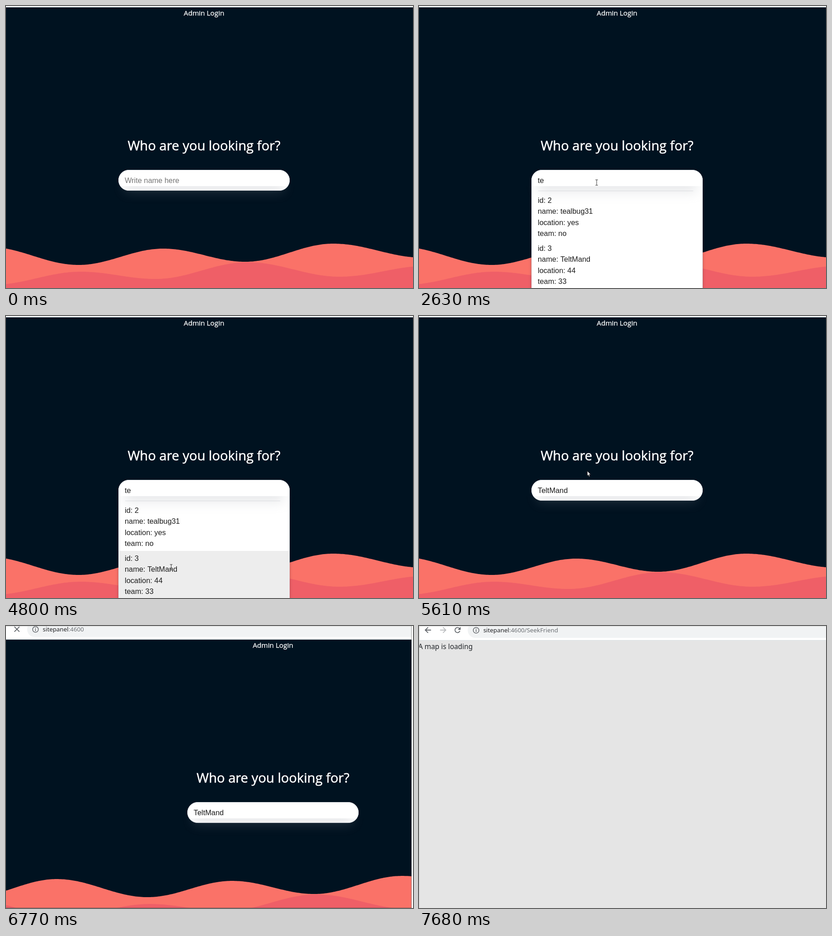
An HTML page with a canvas that plays this animation: 898x623 px, repeating every 8 s.

```html
<!DOCTYPE html>
<html lang="en">
<head>
<meta charset="utf-8">
<title>Person search</title>
<style>
html, body { margin: 0; width: 100%; height: 100%; overflow: hidden; background: #001220; }
canvas { display: block; }
</style>
</head>
<body>
<canvas id="stage" width="898" height="623"></canvas>
<script>
const ctx = document.getElementById('stage').getContext('2d');
const W = 898, H = 623, LOOP = 8000;
const PAGE_LEFT = -213, PAGE_W = 1300, PAGE_TOP = 3, CENTER = 437;

const HEADING = '"Open Sans", sans-serif';
const FIELD = '16.33px "Liberation Sans", Arial, sans-serif';
const SYSTEM = '"Noto Sans", sans-serif';
const ICON = '#5f6368';

const FOCUS_AT = 1750, TYPE_AT = [2280, 2410], OPEN_AT = 2630, CLOSE_AT = 4870;
const PAN_AT = 6150, LEAVE_AT = 7490, RENDER_AT = 7550, LOADED_AT = 7680;

const BOX = { x: 248, y: 362, w: 378, h: 46, r: 23 };
const TEXT_X = 262, ITEM_TOP = 413, ITEM_H = 106, LINE_H = 24.5;

const items = [
  { id: 2, name: 'tealbug31', location: 'yes', team: 'no' },
  { id: 3, name: 'TeltMand', location: 44, team: 33 }
];

const clamp01 = u => Math.min(1, Math.max(0, u));
const progress = (t, from, to) => clamp01((t - from) / (to - from));
const smooth = u => u * u * (3 - 2 * u);
const easeOut = u => 1 - (1 - u) ** 2;
const mix = (a, b, u) => a + (b - a) * u;

function pointerAt(t) {
  let x = 797, y = 587;
  const move = (from, to, toX, toY, ease = smooth) => {
    const u = ease(progress(t, from, to));
    x = mix(x, toX, u);
    y = mix(y, toY, u);
  };
  move(560, 1550, 392, 390, easeOut);
  move(2900, 3280, 402, 543);
  move(3280, 3780, 404, 459);
  move(3780, 4470, 364.5, 555);
  move(5270, 6080, CENTER, -2);
  x -= 45 * Math.sin(2 * Math.PI * progress(t, 5270, 6080));
  return { x, y };
}

function panAt(t) {
  return [213 * smooth(progress(t, PAN_AT, 7110)), 29 * smooth(progress(t, 6253, 6868))];
}

function rect(x, y, w, h, color) {
  ctx.fillStyle = color;
  ctx.fillRect(x, y, w, h);
}

function pill(x, y, w, h, r, color) {
  ctx.fillStyle = color;
  ctx.beginPath();
  ctx.roundRect(x, y, w, h, r);
  ctx.fill();
}

function text(str, x, y, font, color, align = 'left') {
  ctx.font = font;
  ctx.fillStyle = color;
  ctx.textAlign = align;
  ctx.fillText(str, x, y);
}

// A hairline outline gives the regular weight a little more body.
function heading(str, y, size) {
  text(str, CENTER, y, `${size}px ${HEADING}`, '#fff', 'center');
  ctx.strokeStyle = '#fff';
  ctx.lineWidth = size / 55;
  ctx.strokeText(str, CENTER, y);
}

function stroke(color, width, build) {
  ctx.strokeStyle = color;
  ctx.lineWidth = width;
  ctx.beginPath();
  build();
  ctx.stroke();
}

function polyline(...points) {
  points.forEach(([x, y], i) => i ? ctx.lineTo(x, y) : ctx.moveTo(x, y));
}

// Crests and troughs joined by half cosines.
function drawWave(color, ...turns) {
  ctx.fillStyle = color;
  ctx.beginPath();
  ctx.moveTo(turns[0][0], H);
  turns.slice(1).forEach(([x1, y1], i) => {
    const [x0, y0] = turns[i];
    for (let x = x0; x <= x1; x += 3) {
      ctx.lineTo(x, mix(y0, y1, (1 - Math.cos(Math.PI * (x - x0) / (x1 - x0))) / 2));
    }
  });
  ctx.lineTo(turns.at(-1)[0], H);
  ctx.fill();
}

function drawFieldShadow() {
  const bottom = 398;
  ctx.save();
  ctx.beginPath();
  ctx.rect(0, bottom, W, 100);
  ctx.clip();
  ctx.shadowColor = 'rgba(149,157,165,0.22)';
  ctx.shadowBlur = 26;
  ctx.shadowOffsetY = 13;
  rect(TEXT_X, BOX.y, BOX.w - 28, bottom - BOX.y, '#fff');
  ctx.restore();
}

function fieldValue(t) {
  if (t >= CLOSE_AT) return items[1].name;
  return 'te'.slice(0, TYPE_AT.filter(at => t >= at).length);
}

function caretVisible(t) {
  if (t < FOCUS_AT || t >= CLOSE_AT) return false;
  return t < TYPE_AT[1] || (t - 2050) % 1060 < 530;
}

function drawList(pointer) {
  const hovered = Math.floor((pointer.y - ITEM_TOP) / ITEM_H);
  if (items[hovered]) rect(BOX.x + 1, ITEM_TOP + hovered * ITEM_H, BOX.w - 2, ITEM_H, '#ededed');
  rect(TEXT_X + 1, BOX.y + BOX.h, 342, 1, '#e3e5e8');
  drawFieldShadow();
  items.forEach((item, i) => Object.entries(item).forEach(([key, value], row) =>
    text(`${key}: ${value}`, TEXT_X, ITEM_TOP + 21.5 + i * ITEM_H + row * LINE_H, FIELD, '#1c1c1c')));
}

function drawSearch(t, pointer) {
  const open = t >= OPEN_AT && t < CLOSE_AT;
  const height = open ? 400 : BOX.h;

  ctx.save();
  if (open) {
    ctx.shadowColor = 'rgba(32,33,36,0.28)';
    ctx.shadowBlur = 6;
    ctx.shadowOffsetY = 1;
  }
  pill(BOX.x, BOX.y, BOX.w, height, BOX.r, '#fff');
  ctx.restore();
  stroke('#dfe1e5', 1, () =>
    ctx.roundRect(BOX.x + .5, BOX.y + .5, BOX.w - 1, height - 1, BOX.r - .5));

  if (open) drawList(pointer);
  else drawFieldShadow();

  const value = fieldValue(t);
  text(value || 'Write name here', TEXT_X, 391, FIELD, value ? '#1c1c1c' : '#757575');
  if (caretVisible(t)) rect(TEXT_X + ctx.measureText(value).width, 377, 1.2, 18, '#000');
}

function drawSearchPage(t, pointer) {
  rect(PAGE_LEFT, 0, PAGE_W, H, '#001220');
  drawWave('#FA7268', [-230, 572], [-40, 532], [160, 572], [347, 536], [528, 565], [722, 525], [920, 556]);
  drawWave('#EF5F67', [-215, 580], [-30, 616], [165, 587], [330, 603], [533, 566], [736, 598], [930, 574]);
  heading('Admin Login', 21, 15.3);
  heading('Who are you looking for?', 319, 29.1);
  drawSearch(t, pointer);
}

function drawMapPage(t) {
  const ready = t >= RENDER_AT;
  rect(PAGE_LEFT, 0, PAGE_W, H, ready ? '#e5e5e5' : '#fff');
  if (ready) text('A map is loading', PAGE_LEFT - 1.5, 22, `15.4px ${SYSTEM}`, '#212529');
}

function drawArrowIcon(x, y, dir, color) {
  stroke(color, 1.8, () => {
    polyline([x - 6.5 * dir, y], [x + 6 * dir, y]);
    polyline([x, y - 6.2], [x + 6.2 * dir, y], [x, y + 6.2]);
  });
}

function drawReloadIcon(x, y) {
  stroke(ICON, 1.8, () => ctx.arc(x, y, 5.6, .35, 5.5));
  ctx.fillStyle = ICON;
  ctx.beginPath();
  polyline([x + 6.8, y - 7], [x + 6.8, y - .6], [x + .5, y - .6]);
  ctx.fill();
}

function drawStopIcon(x, y) {
  stroke(ICON, 1.8, () => [-5.5, 5.5].forEach(d => polyline([x - d, y - 5.5], [x + d, y + 5.5])));
}

function drawInfoIcon(x, y) {
  stroke(ICON, 1.5, () => ctx.arc(x, y, 6.3, 0, 7));
  rect(x - .8, y - .9, 1.6, 4.4, ICON);
  rect(x - .8, y - 3.5, 1.6, 1.6, ICON);
}

function drawBrowserBar(t) {
  const y = -20, urlX = -71, urlY = -15.2, font = `13.3px ${SYSTEM}`;
  rect(PAGE_LEFT, -80, PAGE_W, 80 + PAGE_TOP, '#fff');
  rect(PAGE_LEFT, PAGE_TOP - 1, PAGE_W, 1, '#dbe2e4');
  pill(-105.5, -37, PAGE_W, 34.3, 17, '#f1f3f4');

  drawArrowIcon(-193, y, -1, ICON);
  drawArrowIcon(-160, y, 1, '#babcbe');
  (t >= LOADED_AT ? drawReloadIcon : drawStopIcon)(-128, y);
  drawInfoIcon(-87, y + .5);

  const host = 'sitepanel';
  text(host, urlX, urlY, font, '#202124');
  const path = t < LEAVE_AT ? ':4600' : ':4600/SeekFriend';
  text(path, urlX + ctx.measureText(host).width, urlY, font, '#6b6f73');
}

// The edge of the captured region shows while it travels.
function drawRegionFrame(t) {
  if (t < PAN_AT) return;
  rect(0, 0, W, 1, '#d6d6d6');
  if (t >= 6700 && t < 6960) {
    rect(W - 4, 0, 1, H, 'rgba(90,90,90,0.6)');
    rect(0, H - 1, W, 1, 'rgba(90,60,60,0.5)');
    rect(W - 3, 0, 3, H, '#fff');
  }
  if (t >= LEAVE_AT) rect(0, 0, 1, H, '#cfcfcf');
}

function overText({ x, y }, t) {
  const within = (left, top, right, bottom) => x > left && x < right && y > top && y < bottom;
  const listOpen = t >= OPEN_AT && t < CLOSE_AT + 150;
  return within(BOX.x, BOX.y, BOX.x + BOX.w, BOX.y + BOX.h)
    || within(268, 290, 606, 328)
    || listOpen && within(TEXT_X, ITEM_TOP, 384, H);
}

function drawPointer(t, pointer) {
  if (t < 560 || t >= 6080) return;
  ctx.save();
  ctx.translate(pointer.x, pointer.y);
  if (overText(pointer, t)) {
    stroke('#333', 1, () => {
      polyline([0, -6], [0, 6]);
      [-6, 6].forEach(y => polyline([-2.8, y], [2.8, y]));
    });
  } else {
    ctx.fillStyle = '#fff';
    stroke('#222', 1, () => {
      polyline([.5, .5], [.5, 11.2], [2.8, 9], [4.4, 12.8], [6.2, 12], [4.6, 8.3], [7.8, 8]);
      ctx.closePath();
      ctx.fill();
    });
  }
  ctx.restore();
}

function render(t) {
  const pointer = pointerAt(t);
  ctx.setTransform(1, 0, 0, 1, ...panAt(t));
  if (t < LEAVE_AT) drawSearchPage(t, pointer);
  else drawMapPage(t);
  drawBrowserBar(t);
  ctx.setTransform(1, 0, 0, 1, 0, 0);
  drawPointer(t, pointer);
  drawRegionFrame(t);
}

const start = performance.now();
function tick() {
  render((performance.now() - start) % LOOP);
  requestAnimationFrame(tick);
}
tick();
</script>
</body>
</html>
```
